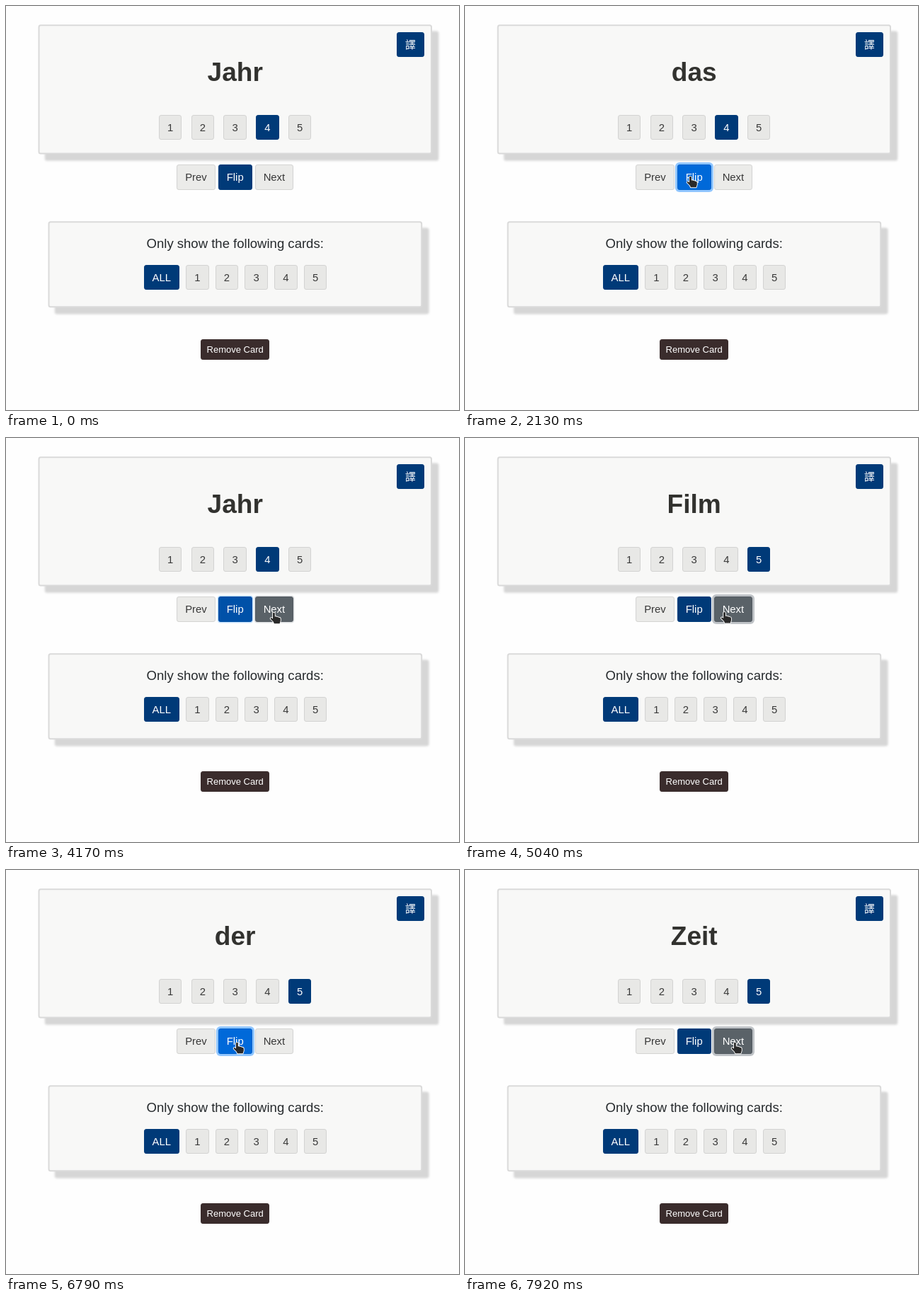
An HTML page for the animation above (8 s loop, 640x571 px).

```html
<!DOCTYPE html>
<html lang="en">
<head>
<meta charset="utf-8">
<title>Flash cards</title>
<style>
  html, body { margin: 0; width: 100%; height: 100%; overflow: hidden; background: #fefefe; }
  svg { display: block; width: 100%; height: 100%; }
  text { font-family: "Liberation Sans", Arial, sans-serif; text-anchor: middle; }
  .cjk { font-family: "Noto Sans CJK TC", "Noto Sans CJK JP", "Noto Sans CJK", sans-serif; }
  .pointer { fill: #2a2a2a; stroke: #fff; stroke-width: 1.8; stroke-linejoin: round; paint-order: stroke; }
</style>
</head>
<body>
<svg viewBox="0 0 640 571">
  <filter id="soft" x="-5%" y="-10%" width="110%" height="120%"><feGaussianBlur stdDeviation="1.6"/></filter>
</svg>
<script>
const LOOP = 8000, FADE = 150, HOLD = 120;
const NAVY = '#003a78', BLUE = '#0069d9', LIGHT = '#ebebe9', GREY = '#e8e8e6';
const SLATE = '#5a6268', INK = '#383838', EDGE = '#d3d3d2', WHITE = '#ffffff';
const svg = document.querySelector('svg');

function set(el, attrs) {
  for (const key in attrs) el.setAttribute(key, attrs[key]);
}
function add(tag, attrs, content = '') {
  const el = document.createElementNS('http://www.w3.org/2000/svg', tag);
  set(el, attrs);
  el.textContent = content;
  return svg.appendChild(el);
}
const lerp = (a, b, k) => a + (b - a) * k;
const channels = hex => [1, 3, 5].map(i => parseInt(hex.slice(i, i + 2), 16));
function mix(from, to, k) {
  const end = channels(to);
  return `rgb(${channels(from).map((v, i) => Math.round(lerp(v, end[i], k)))})`;
}

function card(x, y, width, height) {
  add('rect', { x: x + 9.3, y: y + 9.3, width, height, rx: 3, fill: '#d6d6d6', filter: 'url(#soft)' });
  add('rect', { x: x + 1, y: y + 1, width: width - 2, height: height - 2, rx: 2.5,
    fill: '#f8f8f7', stroke: '#dadada', 'stroke-width': 2 });
}

// Button edges sit on whole pixels; the label keeps its exact centre.
function button(label, cx, top, w, { h = 35.2, size = 14.85, fill = GREY, color = INK, edge = EDGE, cls = '' } = {}) {
  const x = Math.round(cx - w / 2), y = Math.round(top);
  const width = Math.round(cx + w / 2) - x, height = Math.round(top + h) - y;
  const ring = add('rect', {});
  const rect = add('rect', { x: x + .5, y: y + .5, width: width - 1, height: height - 1, rx: 2.6 });
  const text = add('text', { x: cx, y: top + h / 2 + size * .36, 'font-size': size, class: cls }, label);
  const paint = (bg, fg, line) => {
    set(rect, { fill: bg, stroke: line });
    set(text, { fill: fg });
  };
  const glow = (tint, k) => set(ring, { x: x - 3 * k, y: y - 3 * k, width: width + 6 * k,
    height: height + 6 * k, rx: 3 + 3 * k, fill: tint, opacity: .5 * k });
  glow('none', 0);
  paint(fill, color, edge);
  return { paint, glow, left: x, right: x + width, bottom: y + height };
}

const active = { fill: NAVY, color: WHITE, edge: NAVY };
card(45.5, 26.3, 556.5, 183.2);
card(59.5, 304.3, 528.7, 122);
const word = add('text', { x: 323.7, y: 105.7, 'font-size': 37.1, 'font-weight': 'bold', fill: '#32322f' });
button('譯', 571.4, 37.1, 39, { ...active, cls: 'cjk' });
const ratings = [1, 2, 3, 4, 5].map(n => button(n, 186.3 + 45.75 * n, 153.8, 32.5));
button('Prev', 268.4, 224.3, 54.7, { fill: LIGHT });
const flip = button('Flip', 323.7, 224.3, 48.2, active);
const next = button('Next', 378.9, 224.3, 54.7, { fill: LIGHT });
add('text', { x: 323.7, y: 342, 'font-size': 18.55, fill: '#262a2d' }, 'Only show the following cards:');
button('ALL', 219.8, 366, 50, active);
for (let n = 1; n <= 5; n++) button(n, 228.6 + 41.7 * n, 366, 32.5);
const brown = '#3a2c2c';
button('Remove Card', 323.7, 470.8, 96.6, { h: 28.8, size: 13, fill: brown, color: WHITE, edge: brown });

const arrow = add('path', { class: 'pointer', d: 'M0 0V14L3.2 11 5.5 16 7.8 15 5.6 10.2H10Z' });
const hand = add('path', { class: 'pointer',
  d: 'M-2 1.2Q-2-.2-.6-.2T.8 1.2V5.6Q2.7 4.8 3.5 5.9 5.1 5.5 6 6.8 8.8 6.4 8.8 8.8V11.5L7.6 15.3H0L-1.4 12.4-5.2 8.7Q-5.6 7.2-4.1 7.1L-2 8.5Z' });

const moves = [
  { at: 540, lasts: 640, to: flip, x: 319, y: 241, sag: 0 },
  { at: 3580, lasts: 450, to: next, x: 379, y: 247, sag: 0 },
  { at: 5000, lasts: 340, to: flip, x: 327, y: 244, sag: 0 },
  { at: 7130, lasts: 380, to: next, x: 382, y: 244, sag: 10 }
];
const clicks = [
  { at: 1920, on: flip, text: 'das', level: 4 },
  { at: 3080, on: flip, text: 'Jahr', level: 4 },
  { at: 4095, on: next, text: 'Film', level: 5 },
  { at: 5787, on: flip, text: 'der', level: 5 },
  { at: 6775, on: flip, text: 'Film', level: 5 },
  { at: 7745, on: next, text: 'Zeit', level: 5 }
];
const firstFace = { text: 'Jahr', level: 4 };

// Each move eases out from the previous stop; hover begins where it crosses the button's near edge.
let stop = { x: 92, y: 280 };
for (const move of moves) {
  move.from = stop;
  const edge = stop.x < move.x ? move.to.left : move.to.right;
  const covered = (edge - stop.x) / (move.x - stop.x);
  move.enters = move.at + move.lasts * (1 - Math.sqrt(1 - covered));
  stop = move;
}

function pointerAt(t) {
  const move = moves.findLast(m => m.at <= t);
  if (!move) return null;
  const u = Math.min(1, (t - move.at) / move.lasts), k = 1 - (1 - u) ** 2;
  return { x: lerp(move.from.x, move.x, k), y: lerp(move.from.y, move.y, k) + move.sag * Math.sin(Math.PI * u) };
}

// A button is focused by its own click and released by a click elsewhere; hover also lights it.
const focusSteps = btn => clicks.map(c => ({ at: c.at, value: +(c.on === btn) }));
const lightSteps = btn => moves.filter(m => m.to === btn).map(m => ({ at: m.enters, value: 1 }))
  .concat(focusSteps(btn)).sort((a, b) => a.at - b.at);
for (const btn of [flip, next]) {
  btn.focus = focusSteps(btn);
  btn.light = lightSteps(btn);
}
function fadeAt(steps, t) {
  const i = steps.findLastIndex(s => s.at <= t);
  if (i < 0) return 0;
  const u = Math.min(1, (t - steps[i].at) / FADE);
  return lerp(i ? steps[i - 1].value : 0, steps[i].value, u * u * (3 - 2 * u));
}

function drawPointer(t) {
  const p = pointerAt(t);
  const over = p && [flip, next].some(b => p.x >= b.left && p.x <= b.right && p.y < b.bottom);
  const transform = p ? `translate(${p.x} ${p.y})` : '';
  set(hand, { transform, visibility: over ? 'visible' : 'hidden' });
  set(arrow, { transform, visibility: p && !over ? 'visible' : 'hidden' });
}

function render(t) {
  const face = clicks.findLast(c => c.at + HOLD <= t) || firstFace;
  word.textContent = face.text;
  ratings.forEach((r, i) => i + 1 === face.level ? r.paint(NAVY, WHITE, NAVY) : r.paint(GREY, INK, EDGE));

  const blue = fadeAt(flip.light, t), dark = fadeAt(next.light, t);
  flip.paint(mix(NAVY, BLUE, blue), WHITE, mix(NAVY, '#0062cc', blue));
  flip.glow('#268fff', fadeAt(flip.focus, t));
  next.paint(mix(LIGHT, SLATE, dark), mix(INK, WHITE, dark), mix(EDGE, '#545b62', dark));
  next.glow('#828a91', fadeAt(next.focus, t));
  drawPointer(t);
}

const begin = performance.now();
function tick() {
  render((performance.now() - begin) % LOOP);
  requestAnimationFrame(tick);
}
tick();
</script>
</body>
</html>
```
